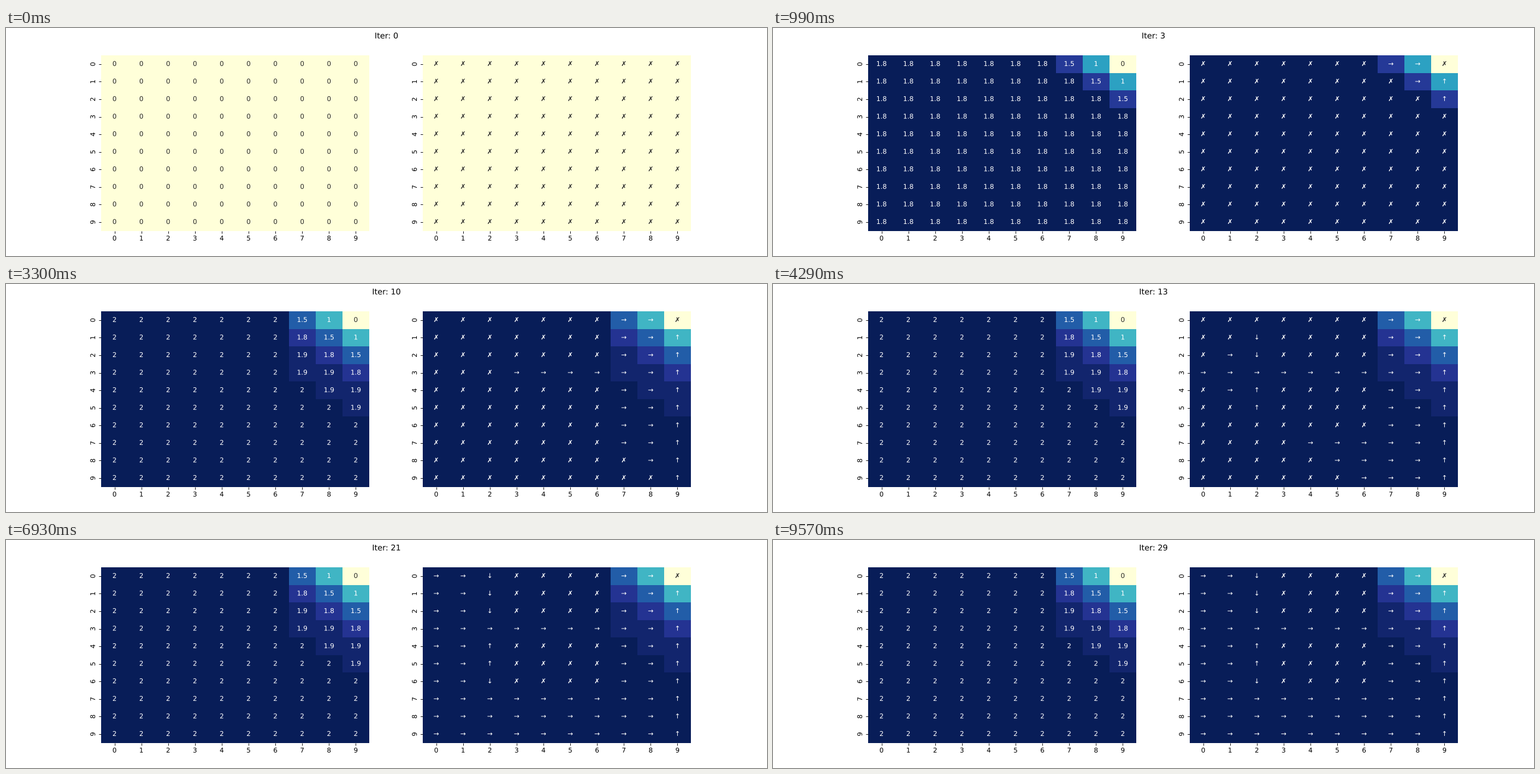
These frames come from a looping animation (1280x384 px, 9900 ms). A matplotlib script:

```python
import numpy as np
import matplotlib.pyplot as plt
from matplotlib.animation import FuncAnimation
from matplotlib.patheffects import Normal

N = 10
STEPS = 30
GOAL = (0, 9)
MOVES = (("→", 0, 1), ("↑", -1, 0), ("↓", 1, 0), ("←", 0, -1))
CMAP = plt.get_cmap("YlGnBu")
CELLS = [(r, c) for r in range(N) for c in range(N)]
# outlines keep glyphs at fractional pixel positions
OUTLINE = [Normal()]

plt.rcParams.update({"font.family": "DejaVu Sans", "text.hinting": "none"})


def sealed(r, c):
    """Rooms that can never reach the goal."""
    return 3 <= c <= 6 and r in (0, 1, 2, 4, 5, 6)


def neighbours(r, c):
    for arrow, dr, dc in MOVES:
        y, x = r + dr, c + dc
        if not (0 <= y < N and 0 <= x < N) or sealed(y, x):
            continue
        if c < 3 and {r, y} == {5, 6}:  # wall on the left side
            continue
        yield arrow, (y, x)


def solve():
    """Steps to the goal and the best move for every cell."""
    dist = np.full((N, N), np.inf)
    dist[GOAL] = 0
    queue = [GOAL]
    for cell in queue:
        for _, near in neighbours(*cell):
            if np.isinf(dist[near]):
                dist[near] = dist[cell] + 1
                queue.append(near)
    best = {}
    for cell in queue[1:]:
        best[cell] = next(a for a, near in neighbours(*cell)
                          if dist[near] == dist[cell] - 1)
    return dist, best


def text_color(rgba):
    rgb = np.asarray(rgba[:3])
    lin = np.where(rgb <= 0.03928, rgb / 12.92, ((rgb + 0.055) / 1.055) ** 2.4)
    return ".15" if lin @ (0.2126, 0.7152, 0.0722) > 0.408 else "w"


def shade(values, names):
    """Cells with the same label share one shade, scaled to 0..1."""
    out = np.zeros_like(values)
    for name in np.unique(names):
        out[names == name] = np.median(values[names == name])
    return out / (out.max() or 1)


def heatmap(ax):
    mesh = ax.pcolormesh(np.zeros((N, N)), cmap=CMAP, vmin=0, vmax=1)
    ax.set(xlim=(0, N), ylim=(N, 0))
    ticks = np.arange(N) + 0.5
    ax.set_xticks(ticks, range(N), path_effects=OUTLINE)
    ax.set_yticks(ticks, range(N), rotation="vertical", va="center",
                  path_effects=OUTLINE)
    ax.spines[:].set_visible(False)
    labels = {(r, c): ax.text(c + 0.5, r + 0.5, "", ha="center", va="center",
                              path_effects=OUTLINE)
              for r, c in CELLS}
    return mesh, labels


DIST, BEST = solve()
fig, axes = plt.subplots(1, 2, figsize=(16, 4.8), dpi=80)
title = fig.suptitle("", path_effects=OUTLINE)
maps = [heatmap(ax) for ax in axes]


def update(step):
    # cost 1 per move, discount 0.5
    values = 2 - 2.0 ** (1 - np.minimum(DIST, step))
    names = np.array([[f"{v:.2g}" for v in row] for row in values])
    shades = shade(values, names)
    colors = CMAP(shades)
    title.set_text(f"Iter: {step}")
    for mesh, _ in maps:
        mesh.set_array(shades)
    for cell in CELLS:
        move = BEST.get(cell, "✗") if DIST[cell] < step else "✗"
        ink = text_color(colors[cell])
        for (_, labels), text in zip(maps, (names[cell], move)):
            labels[cell].set(text=text, color=ink)
    return []


anim = FuncAnimation(fig, update, frames=STEPS, interval=330, repeat=True)
plt.show()
```
